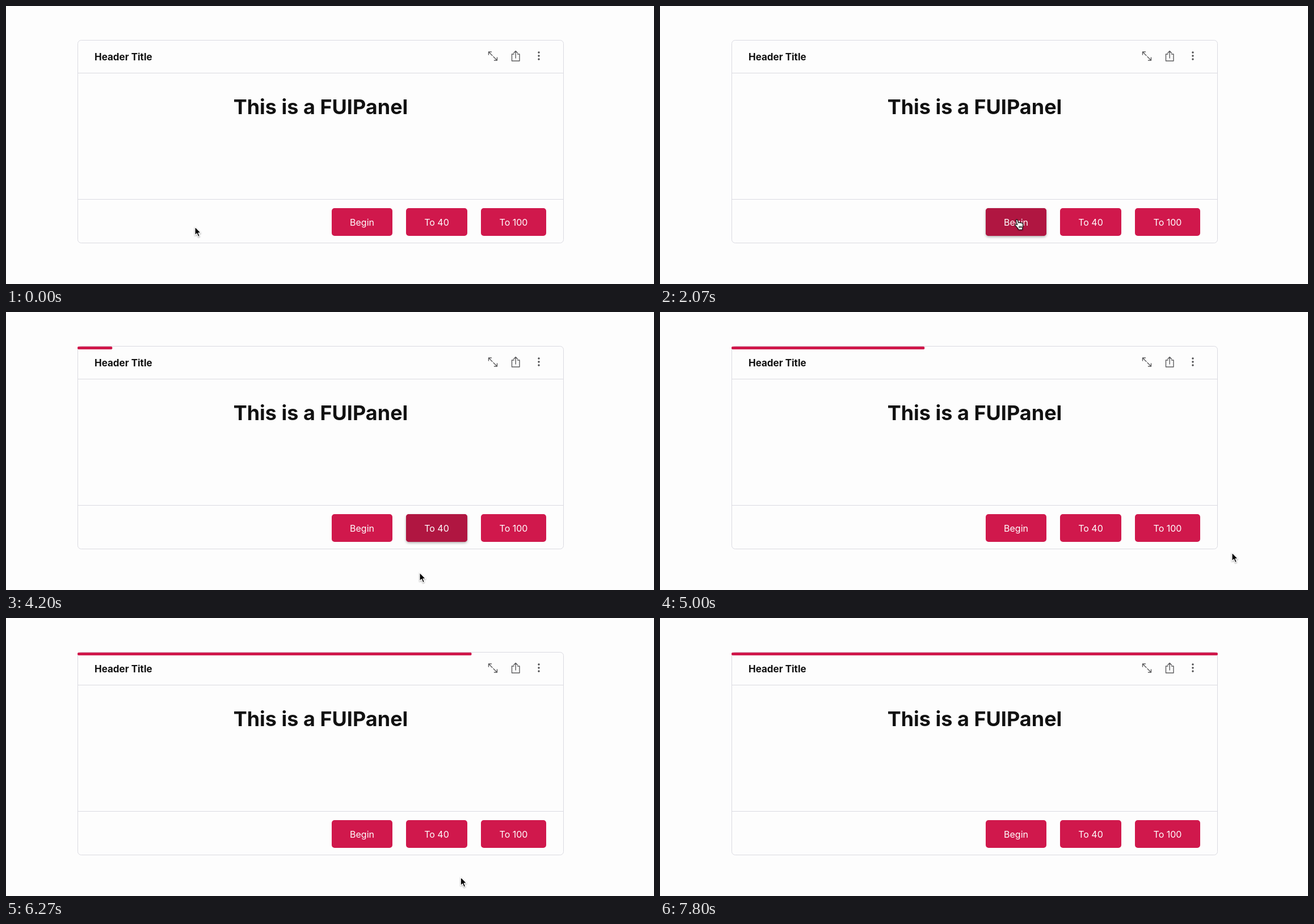
An HTML page that plays this animation: 1142x491 px, repeating every 7990 ms.

```html
<!DOCTYPE html>
<html lang="en">
<head>
<meta charset="utf-8">
<title>Panel with progress bar</title>
<style>
  html, body { margin: 0; width: 100%; height: 100%; overflow: hidden; background: #fdfdfd; }
  svg { display: block; width: 100%; height: 100%; font-family: Inter, sans-serif; }
  .border { fill: none; stroke: #dadae1; }
  .icon { fill: none; stroke: #5c5c5e; stroke-width: 1.4; stroke-linecap: round; stroke-linejoin: round; }
  .hover { fill: #b01641; filter: drop-shadow(0 2px 2px rgba(0, 0, 0, .3)); }
  .label { fill: #fff; font-size: 16px; text-anchor: middle; }
  #cursor { filter: drop-shadow(0 1px 1px rgba(0, 0, 0, .35)); }
</style>
</head>
<body>
<svg viewBox="0 0 1142 491">
  <rect class="border" x="126.5" y="60.5" width="856" height="358" rx="6"/>
  <path class="border" d="M126 118.5H983M126 341.5H983"/>
  <rect id="bar" x="126" y="61" height="5" rx="2" fill="#d0184b"/>

  <g fill="#111" font-weight="700">
    <text x="156" y="96" font-size="17">Header Title</text>
    <text x="554.5" y="190.5" font-size="36" text-anchor="middle">This is a FUIPanel</text>
  </g>

  <g class="icon">
    <path d="M850.5 86V81h5M850.5 81l6.5 6.5M865.5 91v5h-5M865.5 96l-6.5-6.5"/>
    <path d="M895 85h-3.5v12h13.5v-12h-3.5M898.2 92V80M894.8 83l3.4-3.4 3.4 3.4"/>
  </g>
  <g fill="#4c4c4e">
    <circle cx="939" cy="82" r="1.7"/><circle cx="939" cy="88" r="1.7"/><circle cx="939" cy="94" r="1.7"/>
  </g>

  <g id="buttons"></g>

  <g id="cursor">
    <path id="arrow" fill="#000" stroke="#fff" stroke-width="1.2" stroke-linejoin="round"
      d="M0 0V15L3.4 11.8 5.8 17.6 8.4 16.5 6 10.8H10.6Z"/>
    <path id="hand" fill="#fff" stroke="#111" stroke-width="1.2" stroke-linejoin="round"
      d="M.7 9.5L-1.6 2.2C-2.1 .2 .3 -.6 1 1.2L2.9 6.2C3.1 5 5.1 4.8 5.5 6.2 6.1 5.2 7.7 5.3 8.1 6.6
         8.9 5.9 10.3 6.4 10.5 7.8 10.9 10 10.7 12 9.8 14.5V18H2.8C1.8 15-.9 12.5-2.9 10.4-3.9 9.2-2.5 8-1.1 8.8Z
         M4 11.5V15M6 11.5V15M8 11.5V15"/>
  </g>
</svg>
<script>
const LOOP = 7990;
const TOP = 357, HEIGHT = 49;
const BUTTONS = [
  { label: 'Begin', x: 574, width: 107, hover: [1480, 3330] },
  { label: 'To 40', x: 705, width: 108, hover: [3420, 4210] },
  { label: 'To 100', x: 837, width: 115, hover: [5560, 6060] },
];
const FADE = 150;

// Bar widths reached after each click.
const BAR_TIME = 1000;
const CLICKS = [[2080, 43], [4125, 343], [5870, 857]];

// Pointer waypoints: time, x, y. Repeated positions are rests.
const ROUTE = [
  [0, 333, 390], [370, 333, 390], [640, 470, 455], [870, 605, 453], [1090, 605, 453],
  [1360, 614, 412], [1600, 629, 377], [3140, 629, 377], [3400, 695, 383], [3600, 755, 384],
  [4040, 755, 384], [4200, 729, 460], [4400, 748, 467], [4670, 880, 442], [4950, 1008, 425],
  [5330, 1008, 425], [5600, 940, 395], [5750, 915, 389], [5880, 915, 389], [6100, 862, 435],
  [6330, 780, 462], [6600, 690, 463], [6870, 640, 457], [7070, 622, 452], [7160, 622, 452],
  [7500, 740, 220], [7740, 850, 6], [7800, 880, -40], [LOOP, 880, -40],
];

const $ = id => document.getElementById(id);
const clamp = v => Math.min(1, Math.max(0, v));

$('buttons').innerHTML = BUTTONS.map(({ label, x, width }) => {
  const box = `x="${x}" y="${TOP}" width="${width}" height="${HEIGHT}" rx="5"`;
  return `<rect ${box} fill="#d0184c"/><rect ${box} class="hover"/>
    <text class="label" x="${x + width / 2}" y="387.5">${label}</text>`;
}).join('');
const hovers = document.querySelectorAll('.hover');

// The CSS "ease" curve, cubic-bezier(.25, .1, .25, 1).
function ease(p) {
  let low = 0, high = 1, u = p;
  for (let i = 0; i < 20; i++) {
    u = (low + high) / 2;
    if (.75 * u * (1 - u) + u ** 3 < p) low = u; else high = u;
  }
  return .3 * u * (1 - u) ** 2 + 3 * u * u * (1 - u) + u ** 3;
}

function barWidth(t) {
  let width = 0;
  for (const [start, goal] of CLICKS) {
    if (t > start) width += (goal - width) * (t >= start + BAR_TIME ? 1 : ease((t - start) / BAR_TIME));
  }
  return width;
}

function slope(i, axis) {
  const before = ROUTE[i - 1], here = ROUTE[i], after = ROUTE[i + 1];
  const rests = other => !other || (other[1] === here[1] && other[2] === here[2]);
  if (rests(before) || rests(after)) return 0;
  return (after[axis] - before[axis]) / (after[0] - before[0]);
}

function pointerAt(t) {
  const i = ROUTE.findIndex(point => point[0] > t) - 1;
  const a = ROUTE[i], b = ROUTE[i + 1], span = b[0] - a[0], p = (t - a[0]) / span, q = 1 - p;
  return [1, 2].map(axis =>
    a[axis] * q * q * (1 + 2 * p) + b[axis] * p * p * (1 + 2 * q) +
    span * p * q * (slope(i, axis) * q - slope(i + 1, axis) * p));
}

function draw(now) {
  const t = now % LOOP;
  $('bar').setAttribute('width', barWidth(t));

  BUTTONS.forEach(({ hover: [start, end] }, i) => {
    hovers[i].style.opacity = clamp((t - start) / FADE) * clamp(1 - (t - end) / FADE);
  });

  const [x, y] = pointerAt(t);
  const onButton = y > TOP && y < TOP + HEIGHT && BUTTONS.some(b => x > b.x && x < b.x + b.width);
  $('cursor').setAttribute('transform', `translate(${x} ${y})`);
  $('hand').style.display = onButton ? '' : 'none';
  $('arrow').style.display = onButton ? 'none' : '';
}

const began = performance.now();
function tick() {
  draw(performance.now() - began);
  requestAnimationFrame(tick);
}
tick();
</script>
</body>
</html>
```
